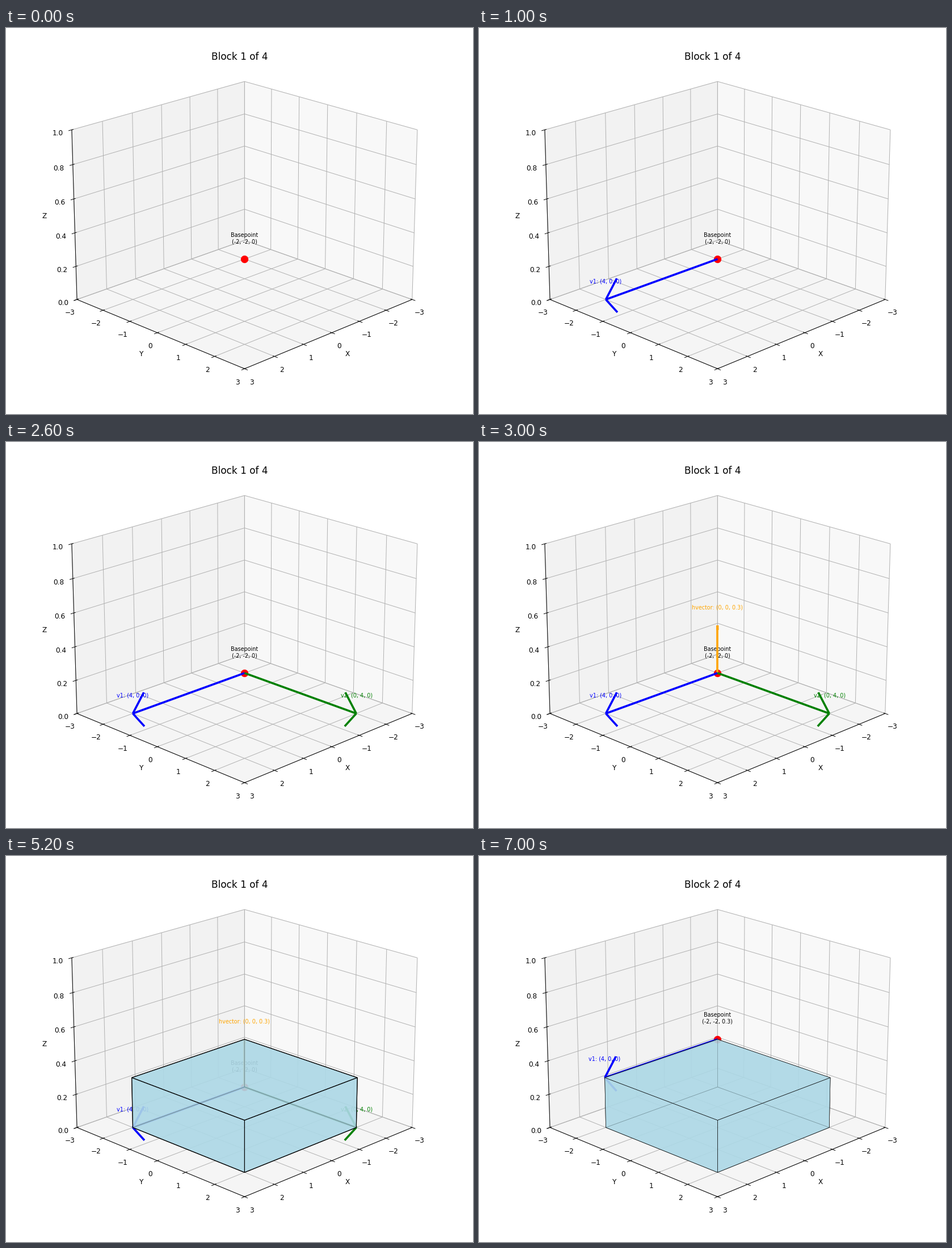
Animation, 823 px wide and 680 px high, one loop 8 s. Source, as a matplotlib script:

```python
import matplotlib.pyplot as plt
import numpy as np
from matplotlib.animation import FuncAnimation
from mpl_toolkits.mplot3d.art3d import Poly3DCollection

WIDTH, HEIGHT, DPI = 823, 680, 87
SIDE = 659                      # square axes, centred on the stage
BLOCKS, STEPS_PER_BLOCK, FRAMES = 4, 6, 8
BLOCK_HEIGHT = 0.3
EDGES = [("v1", (4, 0, 0), "blue"),
         ("v2", (0, 4, 0), "green"),
         ("hvector", (0, 0, BLOCK_HEIGHT), "orange")]

plt.rcParams["font.family"] = "DejaVu Sans"
fig = plt.figure(figsize=((WIDTH + 1e-6) / DPI, (HEIGHT + 1e-6) / DPI), dpi=DPI)
ax = fig.add_axes([(WIDTH - SIDE) / 2 / WIDTH, (HEIGHT - SIDE) / 2 / HEIGHT,
                   SIDE / WIDTH, SIDE / HEIGHT], projection="3d")


def base_of(block):
    return np.array([-2, -2, BLOCK_HEIGHT * block])


def as_tuple(point):
    return "(" + ", ".join(f"{c:g}" for c in point) + ")"


def label(point, text, color):
    x, y, z = point
    ax.text(x, y, z + 0.1, text, color=color, fontsize=8, ha="center")


def draw_block(block, linewidth):
    base = base_of(block)
    a, b, h = (np.array(vec) for _, vec, _ in EDGES)
    faces = []
    for p, q, r in [(a, b, h), (a, h, b), (b, h, a)]:
        for start in (base, base + r):
            faces.append([start, start + p, start + p + q, start + q])
    ax.add_collection3d(Poly3DCollection(
        faces, facecolors="lightblue", edgecolors="black",
        linewidths=linewidth, alpha=0.7))


def draw_vector(base, name, vec, color):
    ax.quiver(*base, *vec, color=color, linewidth=3, arrow_length_ratio=0.1)
    label(base + vec, f"{name}: {as_tuple(vec)}", color)


def update(frame):
    block, step = divmod(frame, STEPS_PER_BLOCK)
    ax.clear()
    ax.set_title(f"Block {block + 1} of {BLOCKS}", fontsize=14, y=1.0)
    ax.set(xlabel="X", ylabel="Y", zlabel="Z")

    for done in range(block):
        draw_block(done, 0.5)

    base = base_of(block)
    ax.scatter(*base, color="red", s=100)
    label(base, f"Basepoint\n{as_tuple(base)}", "black")
    for name, vec, color in EDGES[:step]:
        draw_vector(base, name, vec, color)
    if step > len(EDGES):
        draw_block(block, 1)

    ax.set(xlim=(-3, 3), ylim=(-3, 3), zlim=(0, 1))
    ax.view_init(elev=20, azim=45)
    return []


anim = FuncAnimation(fig, update, frames=FRAMES, init_func=lambda: [],
                     interval=1000, repeat=True, repeat_delay=0)
plt.show()
```
